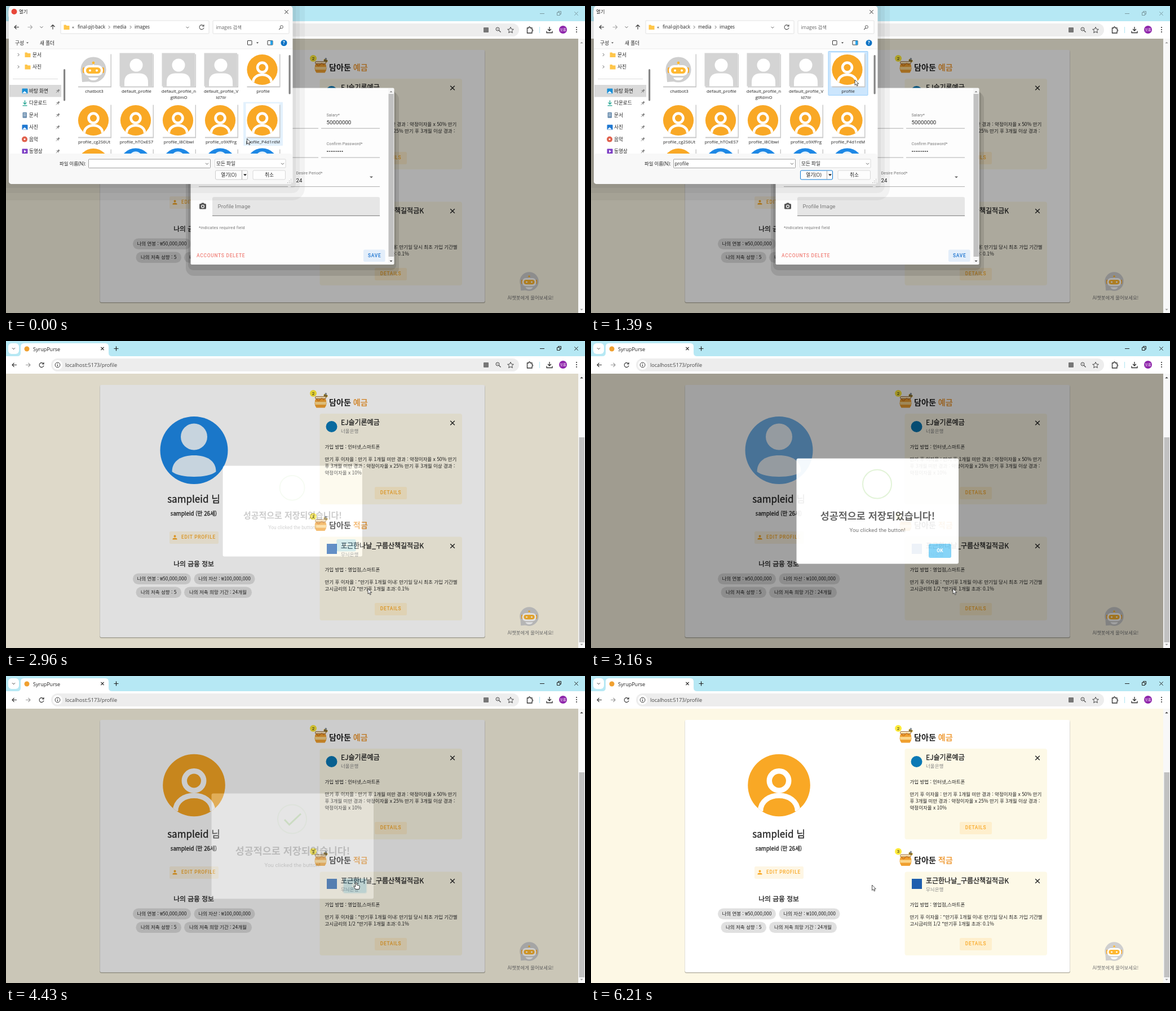
Animation of 1027x545 px, one loop 6.62 s. Source, as an HTML page:

```html
<!DOCTYPE html>
<html lang="ko">
<head>
<meta charset="utf-8">
<title>Profile image upload</title>
<style>
html, body { margin: 0; width: 100%; height: 100%; overflow: hidden; background: #fdf8e5; }
svg { display: block; width: 100vw; height: 100vh; }
text { white-space: pre; font-family: "Noto Sans CJK KR", "Noto Sans CJK", "Noto Sans", sans-serif; fill: #212121; }
.ui text { font-family: "Open Sans", "Noto Sans CJK KR", "Noto Sans CJK", sans-serif; }
.rb text, text.rb { font-family: Roboto, sans-serif; letter-spacing: .09px; }
.mid { text-anchor: middle; }
.md { stroke: #212121; stroke-width: .3px; }
.bd { font-weight: 700; }
text.btn { font: 500 8.4px Roboto, sans-serif; letter-spacing: .75px; fill: #f9a825; }
</style>
</head>
<body>
<svg id="stage" viewBox="0 0 1027 545" preserveAspectRatio="none"></svg>
<script>
const LOOP = 6620;
const ORANGE = '#f9a825', BLUE = '#1e88e5', CREAM = '#fdf8e5';

// ---- drawing helpers ----
const text = (x, y, s, size, attrs = '') => `<text x="${x}" y="${y}" font-size="${size}" ${attrs}>${s}</text>`;
const rect = (x, y, w, h, fill, r = 0, attrs = '') =>
  `<rect x="${x}" y="${y}" width="${w}" height="${h}" rx="${r}" fill="${fill}" ${attrs}/>`;
const circle = (x, y, r, fill, attrs = '') => `<circle cx="${x}" cy="${y}" r="${r}" fill="${fill}" ${attrs}/>`;
const line = (d, color = '#222', w = 1, attrs = '') =>
  `<path d="${d}" fill="none" stroke="${color}" stroke-width="${w}" ${attrs}/>`;
const shape = (d, fill, attrs = '') => `<path d="${d}" fill="${fill}" ${attrs}/>`;
const group = (id, body, attrs = '') => `<g id="${id}" ${attrs}>${body}</g>`;
const at = (x, y, k, body) => `<g transform="translate(${x} ${y}) scale(${k})">${body}</g>`;
const cross = (x, y, r, color = '#222', w = 1.2) =>
  line(`M${x - r} ${y - r}l${2 * r} ${2 * r}m0 ${-2 * r}l${-2 * r} ${2 * r}`, color, w);
const chevron = (x, y, color = '#555') => line(`M${x - 2.5} ${y - 1.2}l2.5 2.5 2.5-2.5`, color, .9);
const angle = (x, y, color = '#555') => line(`M${x - 1.2} ${y - 2.5}l2.5 2.5-2.5 2.5`, color, .9);
const arrow = (x, y, dir, color = '#333') =>
  line(`M${x - 4 * dir} ${y}h${8 * dir}m${-3.5 * dir} -3.5l${3.5 * dir} 3.5 ${-3.5 * dir} 3.5`, color, 1.1);
const reload = (x, y, color = '#333') =>
  line(`M${x + 3.5} ${y - 2}A4 4 0 1 0 ${x + 4} ${y + 1}M${x + 4} ${y - 4.5}v3h-3`, color, 1.1);
const drop = (x, y, color = '#444', r = 3) => shape(`M${x - r} ${y - r / 2}h${2 * r}l${-r} ${r}z`, color);
const rise = (x, y, color = '#444', r = 2.6) => shape(`M${x - r} ${y + r / 2}h${2 * r}l${-r} ${-r}z`, color);
const lens = (x, y, color = '#444') =>
  circle(x - 1, y - 1, 3, 'none', `stroke="${color}"`) + line(`M${x + 1.2} ${y + 1.2}l3.3 3.3`, color, 1.2);
const person = (x, y, k, fill) => at(x, y, k,
  shape('M0-8a4 4 0 1 1 0 8a4 4 0 0 1 0-8M0 2c4.4 0 8 1.8 8 4v2H-8v-2c0-2.2 3.6-4 8-4', fill));
const folder = (x, y) => shape(`M${x - 5} ${y - 4}h4l1 1.5h5v7h-10z`, '#ffc64a');

const userArt = (x, y, k) => at(x, y, k, circle(0, 0, 55.3, ORANGE) +
  `<g clip-path="url(#disc)" fill="none" stroke="#fff" stroke-width="9.5">
  <circle cy="-8" r="17.2"/><path d="M-33 46C-33 9 33 9 33 46"/></g>`);
const blueArt = (x, y, k) => at(x, y, k, circle(0, 0, 60, BLUE) +
  circle(0, -24, 23.5, '#e3f2fd') +
  shape('M-39 38C-39 18-22 9 0 9S39 18 39 38C32 44 16 47 0 47S-32 44-39 38z', '#e3f2fd'));
const botArt = (x, y, k) => at(x, y, k, shape('M-21 9L-20 22L-6 21z', '#cfcfcf') + circle(0, 0, 22.6, '#cfcfcf') +
  line('M0-12v5', '#fff', 1.5) + circle(0, -12, 2.4, '#ffb830') +
  rect(-19, -4, 5, 10, ORANGE, 2) + rect(14, -4, 5, 10, ORANGE, 2) +
  rect(-17, -8, 34, 19, '#fff', 9) + rect(-13, -4, 26, 11, '#ffb830', 5.5) +
  circle(-6, 1.5, 2, '#fff') + circle(6, 1.5, 2, '#fff') + shape('M-9 14h18q-2 5-9 5t-9-5', '#fff'));
const jarArt = (x, y) => at(x, y, 1, shape('M-8.500-6H8.500Q13 3 7.500 10.500H-7.500Q-13 3-8.500-6z', '#f0a030') +
  shape('M-10 0h20l-.5 5h-19z', '#fbd68a') + rect(-9.5, -9.5, 19, 4, '#fae3b5', 1.5, 'stroke="#8a5a2b" stroke-width=".8"') +
  line('M-7-5q3 6 6 1t7 1', '#c9701c', 1.2) +
  `<g transform="translate(9 -11) rotate(25)"><ellipse rx="4" ry="2.2" fill="#f5c542"/>
  <path d="M-2-2v4M0-2v4M2-2v4" stroke="#222"/><ellipse cx="-1" cy="-3" rx="1.8" ry="1.8" fill="#8c969e"/></g>`);

// ---- scene parts ----
function browser() {
  const tabs = rect(0, 0, 1027, 58, '#b6e8f4') + rect(4, 4, 19, 19, '#fff', 6) + chevron(13.5, 13.5, '#222') +
    shape('M20 27q6 0 6-6V10q0-6 6-6H176q6 0 6 6v11q0 6 6 6z', '#fff') + circle(37, 14, 4.5, '#f0a030') +
    text(48, 17.5, 'SyrupPurse', 9) + cross(171, 13.5, 2.6) + line('M191.500 13.500h8m-4-4v8', '#222', 1.2);
  const bar = rect(0, 27, 1027, 31, '#fff') + arrow(15, 42.5, -1) + arrow(39, 42.5, 1, '#999') + reload(63, 42.5) +
    rect(80, 31, 830, 23, '#ededed', 11.5) + circle(91.5, 42.5, 8.5, '#fff') +
    circle(91.5, 42.5, 4.4, 'none', 'stroke="#333"') + line('M91.500 42v3m0-5v1', '#333') +
    text(105, 46, 'localhost:5173/profile', 9.1, 'style="fill:#444"') +
    rect(847, 38, 9, 9, '#777', 1) + lens(873, 42) + line('M871 41h2', '#444', .8) +
    line('M895 37.500l1.600 3.500 3.700.4-2.800 2.500.8 3.700-3.300-1.900-3.300 1.900.8-3.700-2.800-2.500 3.700-.4z', '#444', 1) +
    line('M924.500 39h2.500q0-2 1.500-2t1.500 2h3v3q1.500 0 1.500 1.500t-1.500 1.500v3h-8.500z', '#333', 1.3) +
    line('M946.500 37v11', '#b6e8f4', 1.2) + line('M964 37v7m-3-3l3 3 3-3m-8 3.500v3h10v-3', '#333', 1.3) +
    circle(988, 42, 7, '#8e24aa') + text(988, 44.3, '보름', 6, 'class="mid" style="fill:#fff"') +
    [38, 42, 46].map(y => circle(1012, y, 1.1, '#333')).join('');
  const controls = group('controls', line('M947 13.500h8', '#222') +
    line('M977.500 11.500h5v5h-5zM979.500 11.500v-2h5v5h-2', '#222') + cross(1011.5, 13.5, 3.2, '#222', 1));
  return `<g class="ui">${tabs}${bar}${controls}</g>`;
}

function button(x, y, w, label, dx, fill = '#feefcd') {
  return rect(x, y, w, 22, fill, 2.5) + text(x + dx, y + 13.4, label, 8.4, 'class="btn"');
}

function chip(x, y, w, label) {
  return rect(x, y, w, 19.5, '#e0e0e0', 9.75) + text(x + w / 2, y + 12.8, label, 8.5, 'class="mid"');
}

function product(y, h, count, kind, name, bank, logo, lines) {
  return circle(545, y - 36, 6, '#ffeb3b') + text(545, y - 33.2, count, 8, 'class="mid rb"') + jarArt(558, y - 21) +
    text(573, y - 15.5, `담아둔 <tspan fill="#f0a040">${kind}</tspan>`, 14.1, 'class="bd"') +
    rect(556.5, y, 252.5, h, '#fdf9e7', 4) + logo + text(594, y + 20, name, 12, 'class="md"') +
    text(594, y + 34, bank, 8.5, 'style="fill:#858585"') + cross(792, y + 16.5, 3.8, '#222', 1.4) +
    lines.map((s, i) => text(565.5, y + 61.5 + (i && 10 + 12 * i), s, 8.5)).join('') +
    button(654, y + h - 31, 57, 'DETAILS', 9.7);
}

function page() {
  return rect(0, 58, 1015, 487, CREAM) + rect(166.5, 80, 683.5, 448, '#000', 3, 'opacity=".12"') +
    rect(166, 78.5, 684, 448.5, '#000', 3, 'opacity=".18"') + rect(166.5, 78, 683, 448, '#fff', 3) +
    group('blue', blueArt(333.5, 194, 1)) + group('orange', userArt(333.5, 194, 1)) +
    text(333, 287, 'sampleid 님', 17, 'class="mid md"') + text(333, 310, 'sampleid (만 26세)', 9.7, 'class="mid md"') +
    button(290, 338, 87, 'EDIT PROFILE', 21, '#fef6e4') + person(299.5, 348.5, .5, ORANGE) +
    text(333, 399.5, '나의 금융 정보', 11.8, 'class="mid md"') +
    chip(225, 412.5, 103, '나의 연봉 : ₩50,000,000') + chip(333.5, 412.5, 108, '나의 자산 : ₩100,000,000') +
    chip(230.5, 436.5, 80.5, '나의 저축 성향 : 5') + chip(316, 436.5, 120, '나의 저축 희망 기간 : 24개월') +
    product(129, 161, 2, '예금', 'EJ슬기론예금', '너울은행', circle(577.5, 152, 10, '#0b79b5'), [
      '가입 방법 : 인터넷,스마트폰',
      '만기 후 이자율 : 만기 후 1개월 미만 경과 : 약정이자율 x 50% 만기',
      '후 3개월 미만 경과 : 약정이자율 x 25% 만기 후 3개월 이상 경과 :',
      '약정이자율 x 10%']) +
    product(347.5, 148.5, 3, '적금', '포근한나날_구름산책길적금K', '무늬은행', rect(569, 360, 18, 18, '#1f5fae'), [
      '가입 방법 : 영업점,스마트폰',
      '만기 후 이자율 : *만기후 1개월 이내: 만기일 당시 최초 가입 기간별',
      '고시금리의 1/2 *만기후 1개월 초과: 0.1%']) +
    botArt(928, 489, .74) + text(930.5, 520.5, 'AI챗봇에게 물어보세요!', 8.35, 'class="mid" style="fill:#777"');
}

function pageScroll() {
  return rect(1015, 58, 12, 487, '#f8f8f8') + rise(1021, 65, '#999') + drop(1021, 539, '#999', 2.6) +
    group('thumb', rect(1016.5, 171, 9.5, 364, '#c1c1c1') + rise(1021, 65, '#444'));
}

function field(x, y, w, label, value) {
  return text(x + 9.5, y - 21.7, label, 7.2, 'style="fill:#777"') + text(x + 9.5, y - 7.7, value, 9.6) +
    line(`M${x} ${y}h${w}`, '#9a9a9a', .8);
}

function modal() {
  const dots = '•'.repeat(9);
  return rect(319, 152, 378, 327, '#000', 14, 'opacity=".1"') + rect(323, 149, 369, 320, '#000', 9, 'opacity=".1"') +
    rect(327.5, 145.5, 361, 313.5, '#fdfdfd', 2) +
    rect(678, 146, 10, 312, '#f6f6f6') + rect(678.5, 156, 9, 289, '#c1c1c1') +
    rise(683, 152, '#888') + drop(683, 453, '#444', 2.6) +
    person(349, 165, .6, '#212121') + text(361, 168, 'User Profile', 12.2, 'style="font-weight:500"') +
    field(342, 217.2, 103.5, 'Nickname*', 'sampleid') + field(450.5, 217.2, 103.5, 'Age*', '26') +
    field(559, 217.2, 104, 'Salary*', '50000000') + field(342, 269, 103.5, 'Wealth*', '100000000') +
    field(450.5, 269, 103.5, 'Password*', dots) + field(559, 269, 104, 'Confirm Password*', dots) +
    field(342, 320.6, 158, 'Tendency*', '5') + field(505, 320.6, 158, 'Desire Period*', '24') +
    drop(485.5, 304, '#666') + drop(648, 304, '#666') +
    rect(343, 351, 12, 9.5, '#555', 1.5) + rect(346.5, 349.5, 5, 3, '#555', 1) +
    circle(349, 355.7, 3, '#fff') + circle(349, 355.7, 1.8, '#555') +
    shape('M366 372.500V342q0-3 3-3H660q3 0 3 3v30.500z', '#e6e6e6', 'id="fileBox"') +
    line('M366 372.300h297', '#777', 1, 'id="fileLine"') +
    text(375.5, 359, 'Profile Image', 9.6, 'id="fileLabel"') +
    group('fileValue', text(375.5, 364.7, 'profile.png', 9.6) + circle(646, 355.7, 6, '#555') +
      cross(646, 355.7, 2.3, '#e4e4e4', 1.3)) +
    text(342, 396, '*indicates required field', 7.2, 'style="fill:#777;letter-spacing:.24px"') +
    text(338, 446, 'ACCOUNTS DELETE', 8.4, 'class="btn" style="fill:#f08078"') +
    rect(634, 432.5, 38.5, 21.5, '#e3eefa', 2.5) + text(642, 446, 'SAVE', 8.4, 'class="btn" style="fill:#1a72cf"');
}

function alertBox() {
  return rect(364.5, 208.5, 287.5, 187, '#fff', 3) +
    circle(507.5, 254, 25.5, 'none', 'stroke="#a5dc86" stroke-opacity=".35" stroke-width="2"') +
    line('M494 255l8.500 9 20.500-19.500', '#98d873', 3, 'id="check" pathLength="100" stroke-dasharray="100 200"') +
    text(508.5, 317, '성공적으로 저장되었습니다!', 17.4, 'class="mid bd" style="fill:#595959"') +
    text(508, 339, 'You clicked the button!', 9.6, 'class="mid rb" style="fill:#6b6b6b"') +
    rect(597.5, 358.5, 43, 28, '#bfe3f6', 4, 'id="ring"') + rect(599, 360, 40, 25, '#7cd1f9', 3, 'id="ok"') +
    text(619, 375.3, 'OK', 8.4, 'class="mid rb bd" style="fill:#fff"');
}

function fileGrid() {
  const cols = [156, 231, 306, 381, 455.5];
  const names = [['chatbot3'], ['default_profile'], ['default_profile_n', 'gtRdmO'], ['default_profile_V', 'ld7ilr'],
    ['profile'], ['profile_cg2S6Ut'], ['profile_hTOxES7'], ['profile_l8Clbwl'], ['profile_o9XfFrg'], ['profile_P4d1ntM']];
  const frame = (x, y) => rect(x - 28, y - 27.5, 59, 59, '#c9c9c9') + rect(x - 30, y - 30, 59.5, 59.5, '#fff');
  const silhouette = (x, y) => rect(x - 29.5, y - 29.5, 58.5, 59, '#d4d4d4') + circle(x, y - 8, 11.5, '#fff') +
    shape(`M${x - 21} ${y + 29.5}v-7q0-16 16-16h10q16 0 16 16v7z`, '#fff');
  const files = names.map((label, i) => {
    const x = cols[i % 5], row = i < 5 ? 0 : 1, y = 113 + row * 90;
    const art = i === 0 ? botArt(x - 1, y, 1) : i < 4 ? silhouette(x, y) : userArt(x - 1, y, .49);
    return frame(x, y) + art + label.map((s, k) => text(x + .5, y + 41 + 11 * k, s, 7.85, 'class="mid"')).join('');
  }).join('');
  const next = cols.map((x, i) => frame(x, 282) + (i ? blueArt(x - 1, 280, .46) : userArt(x - 1, 280, .49))).join('');
  return rect(421, 170.5, 70, 77.5, '#e3f1fd', 1, 'id="hoverLow"') +
    rect(421, 80.5, 70, 78, '#e3f1fd', 1, 'id="hoverTop"') + files + `<g clip-path="url(#list)">${next}</g>`;
}

function fileDialog() {
  const shadow = [[22, 29], [13, 16], [6, 7]].map(([r, b]) =>
    rect(-20, -20, 528 + r, 336 + b, '#000', r, 'opacity=".045"')).join('');
  const pin = y => `<g transform="translate(92 ${y}) rotate(45)">${rect(-1.5, -3.5, 3, 4, '#8a8a8a')}${line('M-3 .8h6M0 1v3.500', '#8a8a8a', .9)}</g>`;
  const places = [['바탕 화면', '#1b8fd6'], ['다운로드', '#18a08c'], ['문서', '#6c8fb0'], ['사진', '#1f78d1'],
    ['음악', '#e0604c'], ['동영상', '#7d3fc4']].map(([s, c], i) => {
    const y = 151 + 21.4 * i;
    const icon = i === 1 ? line(`M33.500 ${y - 5}v7m-3-3l3 3 3-3m-7 5.500h8`, c, 1.3)
      : i === 4 ? circle(33, y, 5, c) + circle(33, y, 1.5, '#fff')
      : i === 2 ? rect(29.5, y - 5, 7.5, 10, c, 1) + line(`M31 ${y - 2}h4.500m-4.500 3h4.500`, '#fff', .9)
      : rect(28.5, y - 4.5, 10, 9, c, 1) + shape(i === 5 ? `M32 ${y - 2.5}l4 2.500-4 2.500z` : `M29 ${y + 4}l4-4 4 4z`, '#fff');
    return icon + text(41, y + 3, s, 8.6) + pin(y);
  }).join('');
  const tree = [['문서', 86.5], ['사진', 108]].map(([s, y]) => angle(22, y) + folder(38.5, y) + text(47, y + 3, s, 8.6)).join('');
  const nav = arrow(19, 37.5, -1) + arrow(42.5, 37.5, 1, '#aaa') + chevron(63, 37.5) +
    line('M83 41.500v-8m-3.500 3.500l3.500-3.500 3.500 3.500', '#333', 1.1) +
    rect(97, 26, 263, 23, '#fff', 1, 'stroke="#e2e2e2"') + folder(107.5, 37.5) + text(117, 40, '«', 8) +
    text(127, 40.3, 'final-pjt-back', 8.1) + angle(183, 37.5) + text(190, 40.3, 'media', 8.1) + angle(221, 37.5) +
    text(228, 40.3, 'images', 8.1) + chevron(322, 38) + reload(347, 37.5, '#555') +
    rect(367, 26, 135, 23, '#fff', 1, 'stroke="#e2e2e2"') + text(372.5, 40.5, 'images 검색', 8.4, 'style="fill:#666"') +
    at(488, 38, '-.85 .85', lens(0, 0));
  const tools = text(16, 68.5, '구성', 8.6) + drop(38, 65.5, '#444', 2) + text(60, 68.5, '새 폴더', 8.6) +
    rect(428.5, 61.5, 7.5, 7.5, '#fff', .5, 'stroke="#333"') + drop(446, 65.5, '#222', 2) +
    rect(464, 61.5, 9, 7.5, '#fff', .5, 'stroke="#333"') + rect(469, 61.5, 4, 7.5, '#2aa3e8') +
    circle(493, 65.5, 5.5, '#0a72c4') + text(493, 68.3, '?', 8, 'class="mid bd" style="fill:#fff"');
  const footer = rect(5, 262, 503, 54, '#f8f8f8', 5) + text(95, 282.5, '파일 이름(N):', 8.4) +
    rect(146.5, 272, 216, 15.5, '#fff', 1, 'stroke="#8a8a8a" stroke-width=".8"') + chevron(356.5, 280) +
    text(148.5, 282.7, 'profile', 8.3, 'id="fileName"') +
    rect(370.5, 272, 125.5, 15, '#fff', 1, 'stroke="#d0d0d0" stroke-width=".8"') + text(373, 282.7, '모든 파일', 8.6) +
    chevron(490.5, 280) + rect(371.5, 292, 57, 16, '#fdfdfd', 2, 'id="open" stroke="#ccc"') +
    line('M418.500 292v16', '#999', .8) + text(395, 303.3, '열기(O)', 8.6, 'class="mid"') + drop(424, 300, '#111') +
    rect(438, 292, 57.5, 16, '#fdfdfd', 2, 'stroke="#d0d0d0" stroke-width=".8"') + text(467, 303.3, '취소', 8.6, 'class="mid"') +
    [[506, 310], [506, 313], [503, 313], [506, 307], [503, 310], [500, 313]].map(p => rect(p[0] - 1, p[1], 1.2, 1.2, '#aaa')).join('');
  return shadow + rect(5, 0, 503.5, 316, '#fbfbfb', 5) + circle(14.5, 10, 5, '#e8473a', 'id="appIcon"') +
    text(9, 13, '열기', 8.4, 'id="caption"') + cross(497.5, 10.5, 3.2, '#222', 1) + nav + tools +
    rect(5, 76, 503, 187, '#fff') + line('M5 76h503', '#ececec') + tree + line('M12 129.500h80', '#ddd') +
    rect(6, 140, 92, 21.5, '#dadada') + places + rect(102, 112, 3.2, 56.5, '#858585', 1.6) +
    rect(501.5, 87, 3.2, 69.5, '#858585', 1.6) + fileGrid() + footer;
}

function pointer() {
  return group('pointer', group('arrowTip', shape('M0 0V9.500L2.200 7.600 3.700 11 5.300 10.300 3.800 7H6.800z', '#fff',
    'stroke="#222" stroke-width=".8"')) + group('hand', shape(
    'M-1.200 1Q0-.5 1.200 1V5L5 5.800Q6.500 6.200 6.200 8L5.500 12.500H-1L-4 8Q-4.300 6.500-2.800 7L-1.200 8.300z', '#fff',
    'stroke="#222" stroke-width=".9"')));
}

const stage = document.getElementById('stage');
stage.innerHTML = `<defs><clipPath id="disc"><circle r="55.3"/></clipPath>
  <clipPath id="list"><rect x="110" y="240" width="390" height="22"/></clipPath></defs>` +
  page() + rect(0, 58, 1015, 487, '#000', 0, 'id="scrim"') + group('modal', modal(), 'class="rb"') +
  group('veil', rect(0, 58, 1015, 487, '#000', 0, 'opacity=".4"') + group('alert', alertBox())) +
  browser() + pageScroll() + group('dialog', fileDialog(), 'class="ui"') + pointer();

// ---- timing ----
const $ = Object.fromEntries([...stage.querySelectorAll('[id]')].map(e => [e.id, e]));
const set = (id, name, value) => $[id].setAttribute(name, value);
const fade = (id, v) => { set(id, 'opacity', v); $[id].style.display = v > 0 ? '' : 'none'; };

const bursts = [[200, 200, 1], [600, 1000, 5], [1290, 1880, 7], [2080, 2660, 7], [2760, 3360, 7],
  [3450, 3840, 5], [4230, 4630, 5], [4930, 5510, 7], [6210, 6210, 1]];
const ticks = bursts.flatMap(([a, b, n]) => Array.from({ length: n }, (_, i) => Math.round(a + (b - a) * i / (n - 1 || 1))));
const snap = t => ticks.reduce((last, s) => s <= t ? s : last, 0);

function track(t, keys) {
  const i = keys.findIndex(k => k[0] > t);
  if (i < 0) return keys[keys.length - 1][1];
  if (i === 0) return keys[0][1];
  const [t0, a] = keys[i - 1], [t1, b] = keys[i], p = (t - t0) / (t1 - t0);
  return Array.isArray(a) ? a.map((v, k) => v + (b[k] - v) * p) : a + (b - a) * p;
}

const route = [[500, [427.5, 235.5]], [1000, [468, 131]], [1980, [468, 131]], [2660, [642, 439.5]], [3360, [642, 439.5]],
  [3840, [621, 366]], [4830, [621, 366]], [5030, [835, 424]], [5220, [740, 385]], [5510, [498.5, 371]]];

function draw(ms) {
  const t = snap(ms), [x, y] = track(t, route);
  const picked = t >= 1290, early = t < 200;

  fade('dialog', track(t, [[1390, 1], [1585, 0]]));
  fade('appIcon', early ? 1 : 0);
  set('caption', 'x', early ? 23 : 9);
  fade('hoverLow', y > 171 && t < 1000 ? 1 : 0);
  fade('hoverTop', y < 159 ? 1 : 0);
  set('hoverTop', 'fill', picked ? '#cce6fd' : '#e3f1fd');
  set('hoverTop', 'stroke', picked ? '#99cffb' : 'none');
  fade('fileName', picked ? 1 : 0);
  set('open', 'stroke', picked ? '#0a78d4' : '#ccc');
  set('controls', 'opacity', t < 1480 ? .4 : 1);

  const lift = track(t, [[1480, 0], [1680, 1]]);
  set('fileLabel', 'y', 359 - 8 * lift);
  set('fileLabel', 'font-size', 9.6 - 2.4 * lift);
  $.fileLabel.style.fill = lift ? '#444' : '#777';
  set('fileBox', 'fill', lift ? '#dcdcdc' : '#e6e6e6');
  set('fileLine', 'stroke', lift ? '#222' : '#777');
  set('fileLine', 'stroke-width', 1 + .6 * lift);
  fade('fileValue', lift);

  const open = track(t, [[2760, 1], [2960, 0]]);
  fade('modal', open);
  fade('scrim', .32 * open);
  fade('thumb', t >= 2960 ? 1 : 0);

  // The box leaves a little faster than the veil behind it.
  fade('veil', track(t, [[2860, 0], [2960, .3], [3060, .65], [3160, .92], [3260, 1], [4230, 1], [4330, .92], [4430, .5], [4530, .06], [4630, 0]]));
  fade('alert', track(t, [[4330, 1], [4530, 0]]));
  const k = track(t, [[2860, .5], [3010, 1.04], [3160, 1]]);
  set('alert', 'transform', `translate(508 302) scale(${k}) translate(-508 -302)`);
  fade('check', t > 3260 ? 1 : 0);
  set('check', 'stroke-dashoffset', track(t, [[3260, 100], [3560, 0]]));
  fade('ring', t >= 4230 ? 1 : 0);
  set('ok', 'fill', t >= 4230 ? '#62bfe9' : t >= 3750 ? '#70cbf5' : '#7cd1f9');

  fade('blue', t >= 3450 ? 0 : track(t, [[2960, 1], [3160, .62]]));
  fade('orange', t >= 3450 ? 1 : 0);

  const hand = (t >= 2660 && t < 2860) || (t >= 3740 && t < 4930);
  fade('hand', hand ? 1 : 0);
  fade('arrowTip', hand ? 0 : 1);
  set('pointer', 'transform', `translate(${x} ${y})`);
}

const start = performance.now();
function tick() {
  draw((performance.now() - start) % LOOP);
  requestAnimationFrame(tick);
}
tick();
</script>
</body>
</html>
```
